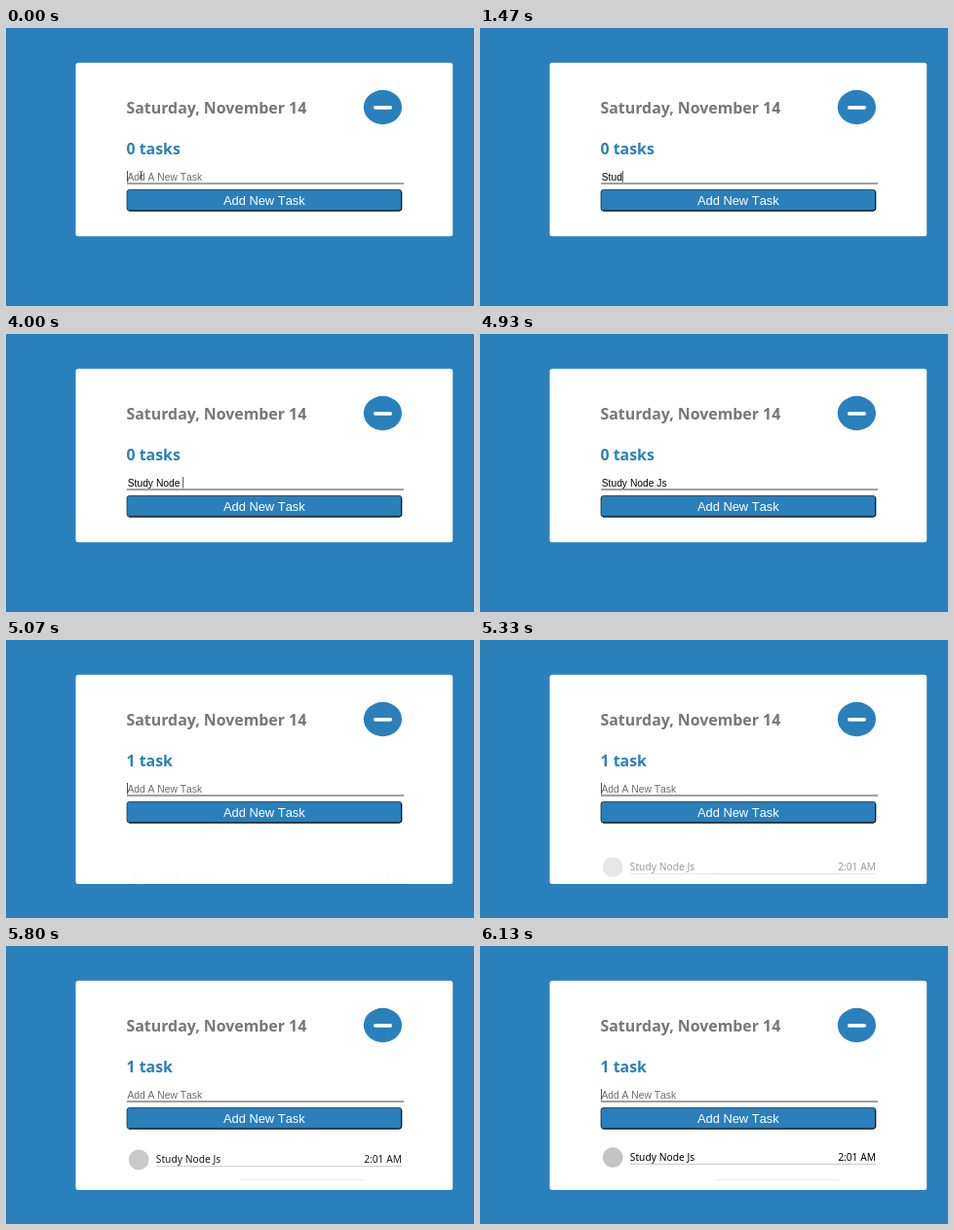
Recreate the animation shown at these times as an HTML page. Size 480 by 286 pixels, loop 6190 ms.

```html
<!DOCTYPE html>
<html lang="en">
<head>
<meta charset="utf-8">
<title>Task list</title>
<style>
  html, body { margin: 0; width: 100%; height: 100%; overflow: hidden; background: #2a80bb; }
  svg { display: block; width: 480px; height: 286px; }
  .head { font: bold 15.9px "Noto Sans", sans-serif; }
  .field { font: 10.3px "Liberation Sans", Arial, sans-serif; font-kerning: none; white-space: pre; }
  .label { font: 12.9px "Liberation Sans", Arial, sans-serif; font-kerning: none; }
  .item { font: 10.25px "Noto Sans", sans-serif; }
</style>
</head>
<body>
<svg viewBox="0 0 480 286" xmlns="http://www.w3.org/2000/svg">
  <rect width="480" height="286" fill="#2a80bb"/>
  <rect id="card" x="71.5" y="35.7" width="386.7" height="178.6" rx="2.5" fill="#fff"/>

  <text class="head" x="123.5" y="87.7" fill="#777">Saturday, November 14</text>
  <ellipse cx="386.4" cy="81.5" rx="19.6" ry="17.7" fill="#2a80bb"/>
  <rect x="377" y="79.9" width="19" height="3.8" rx="1.6" fill="#fff"/>
  <text id="count" class="head" x="123.5" y="130.1" fill="#2a80bb"></text>

  <text id="hint" class="field" x="124.4" y="156.7" fill="#6c6c6c">Add A New Task</text>
  <text id="typed" class="field" x="124.7" y="156.7" fill="#000"></text>
  <rect id="caret" y="147" width=".8" height="11.6" fill="#222"/>
  <path id="beam" d="M136.8 147.5q1.7 0 1.7 1v5.6q0 1-1.7 1M140.2 147.5q-1.7 0-1.7 1v5.6q0 1 1.7 1M137.3 152.2h2.4" fill="none" stroke="#333" stroke-width=".8"/>
  <rect x="124" y="159.5" width="284" height="1" fill="#444"/>

  <rect x="124.1" y="166.4" width="281.6" height="21.6" rx="2.5" fill="#2a80bb" stroke="#1c3548" stroke-width=".9"/>
  <path d="M126 188H403.2q2.5 0 2.5-2.5V168.500" fill="none" stroke="#0a0a0a"/>
  <text class="label" x="264.8" y="181.8" text-anchor="middle" fill="#fff">Add New Task</text>

  <rect id="trace" x="240" y="240" width="128" height="1" fill="#eee"/>
  <g id="row">
    <circle cx="136.2" cy="217.4" r="10.4" fill="#c4c4c4"/>
    <text class="item" x="153.800" y="220.800">Study Node Js</text>
    <text class="item" x="406" y="220.800" text-anchor="end">2:01 AM</text>
    <rect x="154" y="223.7" width="252" height="1" fill="#c4c4c4"/>
  </g>
</svg>
<script>
const LOOP = 6190, ADDED = 5070;
const TEXT = "Study Node Js";
const KEYS = [600, 1130, 1270, 1470, 1930, 2330, 3000, 3270, 3470, 3670, 4000, 4200, 4400];
const CARET_OFF = [[200, 600], [2870, 3000], [4930, 5070], [5600, 6130]];
const RISE = { start: 5040, time: 1200, from: 26.7 };

const $ = id => document.getElementById(id);
const [card, count, hint, typed, caret, beam, trace, row] =
  ["card", "count", "hint", "typed", "caret", "beam", "trace", "row"].map($);
const show = (el, on) => el.setAttribute("visibility", on ? "visible" : "hidden");

// cubic-bezier(.25, .1, .25, 1), solved for x by bisection
function ease(x) {
  if (x <= 0) return 0;
  if (x >= 1) return 1;
  const curve = (a, b, s) => 3 * a * s * (1 - s) ** 2 + 3 * b * s * s * (1 - s) + s ** 3;
  let lo = 0, hi = 1;
  for (let i = 0; i < 24; i++) {
    const mid = (lo + hi) / 2;
    if (curve(.25, .25, mid) < x) lo = mid; else hi = mid;
  }
  return curve(.1, 1, lo);
}

function draw(t) {
  const added = t >= ADDED;
  const length = added ? 0 : KEYS.filter(k => t >= k).length;

  typed.textContent = TEXT.slice(0, length);
  show(hint, length === 0);
  caret.setAttribute("x", length ? 124.7 + typed.getComputedTextLength() : 124.2);
  show(caret, !CARET_OFF.some(([from, to]) => t >= from && t < to));
  show(beam, t < KEYS[0]);

  count.textContent = added ? "1 task" : "0 tasks";
  card.setAttribute("height", added ? 215.4 : 178.6);

  const p = ease((t - RISE.start) / RISE.time);
  show(row, added);
  row.setAttribute("opacity", p);
  row.setAttribute("transform", `translate(0 ${RISE.from * (1 - p)})`);
  show(trace, t >= 5330);
}

function tick() {
  draw(performance.now() % LOOP);
  requestAnimationFrame(tick);
}
tick();
</script>
</body>
</html>
```
